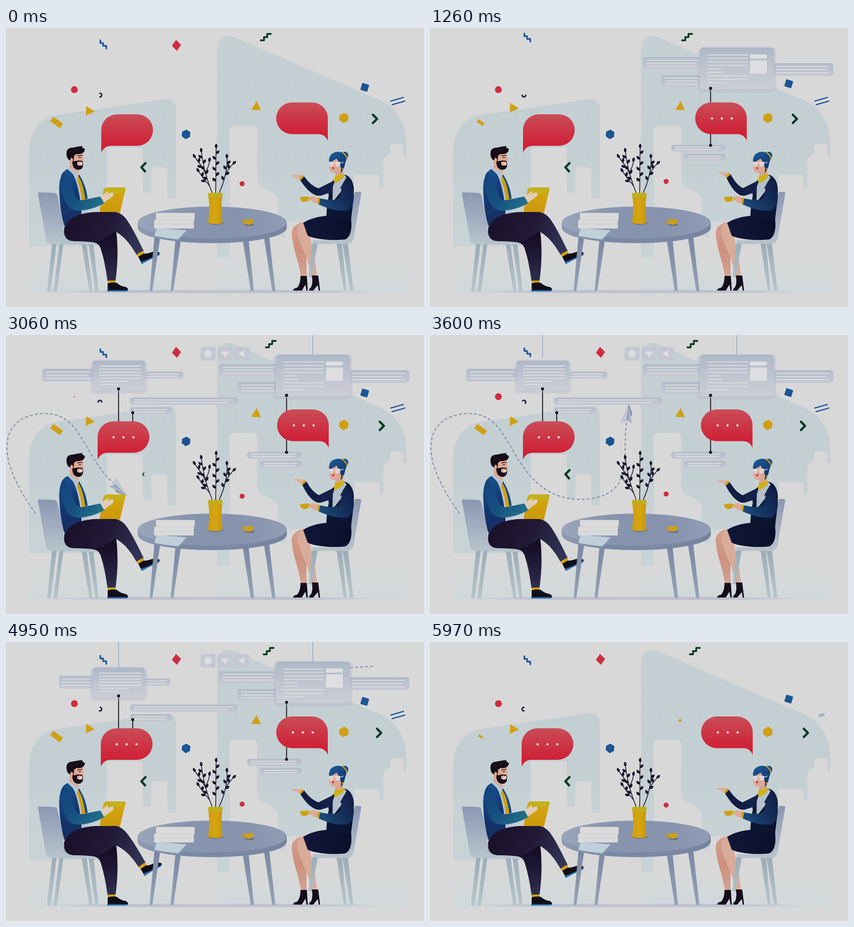
These frames come from a looping animation (917x611 px, 6000 ms). An HTML page:

```html
<!DOCTYPE html>
<html lang="en">
<head>
<meta charset="utf-8">
<title>Conversation at a round table</title>
<style>
  html, body { margin: 0; width: 100%; height: 100%; overflow: hidden; background: #d8d8d8; }
  svg { display: block; width: 100vw; height: 100vh; }
  .line { fill: none; stroke-linecap: round; stroke-linejoin: round; }
</style>
</head>
<body>
<svg id="stage" viewBox="0 0 917 611" xmlns="http://www.w3.org/2000/svg">
  <defs id="defs"></defs>

  <g id="backdrop">
    <path fill="url(#wall)" d="M51 478V270C51 228 73 197 108 191L348 156C364 154 373 164 373 178V374H362Q354 374 354 366V312Q354 305 347 305H326Q319 305 319 312V354Q319 361 312 361H307Q300 361 300 354V262H221V478Z"/>
    <path fill="url(#wall)" d="M463 506V44C463 20 482 12 503 21L820 158C857 174 878 210 878 250V281H872V261Q872 254 865 254H850Q843 254 843 261V276Q834 277 834 282Q828 282 828 289V342Q828 349 823 349Q819 349 819 343V329Q819 322 812 322H764V425H613V458Q596 456 596 448V378C596 366 585 361 572 354C558 348 551 345 551 331V224Q551 214 541 214H501Q491 214 491 224V506Z"/>
    <path fill="url(#ground)" d="M51 500H373V581H51ZM463 505H878V581H463Z"/>
    <ellipse cx="453" cy="577" rx="365" ry="3.500" fill="url(#floor)"/>
  </g>

  <g id="flight">
    <mask id="trail" maskUnits="userSpaceOnUse" x="-10" y="0" width="930" height="611">
      <path id="trim" class="line" stroke="#fff" stroke-width="8" style="stroke-linecap:butt"/>
    </mask>
    <g mask="url(#trail)">
      <path id="route" class="line" style="stroke-linecap:butt" stroke="#7f8eaa" stroke-width="2.200" stroke-dasharray="6.500 4.500"
        d="M65 391C48 366 25 335 9 288C-9 230 5 175 85 172C150 172 163 228 200 282C230 328 270 360 330 360C400 358 428 330 428 260C428 185 432 112 497 92C570 62 680 61 758 56L806 53"/>
    </g>
    <g id="plane">
      <path fill="#bfc5d1" d="M44 0L-3 -13L2 0Z"/>
      <path fill="#8590a8" d="M44 0L2 0L19 11Z"/>
      <path fill="#a9b2c2" d="M44 0L-1 12L4 3Z"/>
    </g>
  </g>

  <g id="cards"></g>
  <g id="bubbles"></g>
  <g id="confetti"></g>

  <g id="manChair">
    <path fill="url(#seatLeg)" d="M101 473H111L98 577H90ZM117 473H126L112 577H104ZM166 473H177L190 577H183ZM181 473H192L203 577H196Z"/>
    <path fill="url(#chair)" d="M70 363Q69 360 73 360L104 361Q111 361 113 368L126 428C124 456 135 465 152 466L194 467Q204 468 203 475L101 473Q90 473 88 464Z"/>
  </g>

  <g id="man">
    <path fill="url(#backLeg)" d="M150 466C190 470 202 465 208 484C216 509 219 530 223 555H240C246 515 246 470 241 440L180 425Z"/>
    <path fill="#d0a012" d="M224 553H240V560H224Z"/>
    <path fill="#110d18" d="M223 559Q234 556 243 558Q250 565 262 567Q268 569 268 575H223Z"/>
    <path fill="#246bab" d="M222 574H268Q267 577 263 577H222Z"/>
    <path fill="url(#folder)" d="M219 349H257Q263 349 262 354L250 404Q249 410 243 410L205 404L214 354Z"/>
    <path fill="#c5b01c" d="M219 349H257Q263 349 262 354L260 362H213L215 353Z"/>
    <path fill="#b8c3cc" d="M138 308L160 320C172 340 180 375 181 411H163C165 380 158 345 146 320Z"/>
    <path fill="#d0a012" d="M153 321L160 320L164 329C170 344 174 360 175 375L166 378C165 358 160 343 156 332Z"/>
    <path fill="#174a80" d="M159 319C168 331 177 352 179 374L174 375C171 354 167 337 159 325Z"/>
    <path fill="url(#jacket)" d="M135 309C121 314 115 335 117 361C118 386 121 408 128 434C140 419 153 412 166 410C164 374 157 336 146 319Z"/>
    <path fill="url(#trousers)" d="M128 437C135 417 162 405 195 403H241C258 408 260 436 241 445L207 467H153C132 468 125 456 128 437Z"/>
    <g id="shin">
      <path fill="url(#trousers)" d="M233 403C249 402 259 411 267 423C282 446 292 468 302 488L287 498C273 473 259 455 235 443C215 432 215 405 233 403Z"/>
      <path fill="#d0a012" d="M286 496L300 488L304 493L290 501Z"/>
      <path fill="#110d18" d="M290 501L302 494Q310 495 319 491Q330 488 337 492L335 498L297 514Z"/>
      <path fill="#246bab" d="M295 512L307 508L334 496L337 493Q338 497 334 499L312 509L298 517Z"/>
    </g>
    <path fill="url(#sleeve)" d="M126 316C137 318 140 341 147 357C152 371 157 378 167 377L207 369L217 383C199 393 181 399 160 400C143 400 134 393 128 375C121 352 116 323 126 316Z"/>
    <path fill="#dfcdb8" d="M207 369C214 365 220 358 225 357L223 363L233 360Q237 360 235 363L236 366L234 369L222 377L215 383Z"/>
    <path fill="#dda995" d="M140 286L148 296L158 308L160 319L152 319L139 309Z"/>
    <path fill="#b8c3cc" d="M135 308L141 306L160 320L156 331L147 320Z"/>
    <path fill="#dda995" d="M146 275L168 271L171 291L167 295V304L148 302Z"/>
    <path fill="#170e1a" d="M133 279C131 267 137 262 146 262C154 261 161 258 168 259L167 262Q172 263 173 266C172 274 165 277 155 276Q148 278 149 286L147 294L140 290Q134 287 133 279Z"/>
    <path fill="#170e1a" d="M145 284L149 292Q157 289 167 291L169 295V302C168 309 160 313 153 309C146 306 145 297 145 284Z"/>
    <path fill="#dda995" d="M156 294Q161 291 168 294V300Q160 304 156 299Z"/>
    <ellipse cx="144" cy="289" rx="3" ry="4.500" fill="#dda995"/>
    <path fill="#dfd0cb" d="M160 296Q164 294 167 296L166 300Q161 301 160 296Z"/>
    <path class="line" stroke="#170e1a" stroke-width="1.400" d="M157 280L167 279M160 284H164"/>
  </g>

  <g id="table">
    <path fill="url(#tableLeg)" d="M326 453H339L321 576H315ZM372 462H384L367 576H361ZM519 462H532L544 576H537ZM565 453H577L591 576H584Z"/>
    <path fill="url(#rim)" d="M289 427V438C292 458 365 471 452 471S613 458 616 438V427Z"/>
    <ellipse cx="452.500" cy="426" rx="163.500" ry="35" fill="url(#tableTop)"/>
    <path fill="#bfd0d8" d="M331 438L396 443L378 463Q350 460 325 455Z"/>
    <path fill="#dadada" d="M329 405H414V420H412V439H325V420H329Z"/>
    <path class="line" stroke="#c6c9cf" stroke-width="1" d="M329 419.500H414M325 429.500H411"/>
    <g id="plant"></g>
    <ellipse cx="460" cy="427" rx="18" ry="4" fill="#707b97"/>
    <path fill="url(#vase)" d="M443 365Q443 361 448 361H471Q476 361 475 366C472 386 472 406 475 425Q475 429 459 429T443 425C447 406 447 386 443 365Z"/>
    <path fill="#c0ae1c" d="M443 365Q443 361 448 361H471Q476 361 475 366L474 371H444Z"/>
    <ellipse cx="534" cy="431" rx="11" ry="2.500" fill="#626d89"/>
    <path class="line" stroke="#c9980f" stroke-width="2" d="M523 421Q518 421 519 425Q520 429 526 428"/>
    <path fill="#cfa013" d="M523 419H543C543 427 539 431 533 431S523 427 523 419Z"/>
  </g>

  <g id="womanChair">
    <path fill="url(#seatLeg)" d="M725 471H737L747 575H741ZM738 471H750L762 575H755Z"/>
  </g>
  <g id="woman">
    <path fill="url(#farLeg)" d="M655 425C637 427 626 437 627 452C629 484 643 512 647 546H659C660 514 656 486 668 458Z"/>
    <path fill="#d9ab9a" d="M655 425C644 428 637 438 640 452C646 480 667 513 671 546H682C680 513 674 484 666 455Z"/>
    <path fill="#130d1b" d="M646 543H660L662 575H659L657 562L649 575H630Q630 570 638 569Q646 562 646 543ZM671 542H685L689 575H686L684 563L674 575H665Q665 570 669 568Q674 559 671 542Z"/>
    <path fill="url(#seatLeg)" d="M672 471H684L670 546H664Z"/>
    <path fill="url(#chair)" d="M764 363Q765 359 769 359H776Q780 359 779 364L763 458Q760 473 746 473H688Q672 473 671 465H735Q755 460 757 425Z"/>
    <path fill="url(#skirt)" d="M704 411C685 413 664 418 652 427L662 455C682 464 720 466 744 463C758 457 759 435 757 418Z"/>
    <path fill="#d7a594" d="M723 311L737 307L741 324L722 331Z"/>
    <path fill="url(#suit)" d="M742 321C757 324 764 340 763 360C762 390 758 406 757 424L703 414C703 397 705 383 708 368L706 345L722 330Z"/>
    <path fill="#142149" d="M724 332L686 351C675 362 680 369 691 367L720 358Z"/>
    <g id="forearm">
      <path fill="#dfb09e" d="M652 322C643 322 638 321 630 322Q624 323 628 325L635 328Q641 331 647 332Z"/>
      <path fill="#cfa013" d="M650 322L655 326L648 335L643 331Z"/>
      <path fill="#101c42" d="M654 325L646 334C656 349 668 363 682 367C694 369 697 353 685 351C672 346 663 337 654 325Z"/>
    </g>
    <path fill="#b5c0c9" d="M741 320L747 327L733 351L739 353L716 382L717 348L722 333Z"/>
    <path fill="#d0b018" d="M722 323Q731 324 740 318L743 324L733 334L722 340L719 335Z"/>
    <path fill="url(#womanSleeve)" d="M745 333C758 332 764 351 763 373C761 398 751 401 736 400C718 399 700 393 685 386L688 373C704 376 720 379 731 373C737 361 734 340 745 333Z"/>
    <path fill="#cfa013" d="M684 371L689 373L687 386L682 384Z"/>
    <path fill="#dfa998" d="M684 372L674 368Q668 368 668 374L671 381Q677 384 683 383Z"/>
    <path class="line" stroke="#cfa013" stroke-width="2" d="M663 372Q669 371 668 375Q666 378 661 378"/>
    <path fill="#cfa013" d="M645 370L664 369C665 377 660 381 654 381S646 377 645 370Z"/>
    <path fill="#dca796" d="M711 286C708 295 708 309 713 315Q722 320 733 314L737 298L727 287Z"/>
    <circle cx="743" cy="279" r="8" fill="#174f87"/>
    <path fill="url(#hair)" d="M709 294C707 281 714 272 728 271C744 271 751 284 744 296Q742 311 734 318Q737 307 732 300Q729 290 725 286Q716 293 709 294Z"/>
    <path class="line" stroke="#cfa013" stroke-width="2.500" d="M738 272Q746 279 749 286"/>
    <path fill="#e0d4d3" d="M709 293H718Q720 302 714 304Q708 302 709 293ZM722 293H733Q735 303 728 304Q721 303 722 293Z"/>
    <path class="line" stroke="#ddd5d8" stroke-width="1.500" d="M716 295L724 296M733 296L740 294"/>
    <path fill="#c62132" d="M715 305L721 306L717 310Z"/>
    <circle cx="739" cy="309" r="2" fill="#d0a012"/>
  </g>
</svg>

<script>
const $ = id => document.getElementById(id);
const LOOP = 6000, STEP = 30;
const POSES = [0, 1260, 2070, 3060, 4170, 4950, 5970];
const WHITE = '#dedee0';

function add(parent, tag, attrs) {
  const el = document.createElementNS('http://www.w3.org/2000/svg', tag);
  for (const k in attrs) el.setAttribute(k, attrs[k]);
  return parent.appendChild(el);
}
const set = (el, value) => el.setAttribute('transform', value);
const clamp = v => Math.max(0, Math.min(1, v));
const ease = v => (1 - Math.cos(Math.PI * clamp(v))) / 2;
const span = (t, a, b) => ease((t - a) / (b - a));
const shown = (t, [a, b, c, d]) => span(t, a, b) * (1 - span(t, c, d));

function track(t, values, times = POSES, curve = ease) {
  let i = 0;
  while (i < times.length - 2 && t >= times[i + 1]) i++;
  const k = curve((t - times[i]) / (times[i + 1] - times[i]));
  return values[i] + (values[i + 1] - values[i]) * k;
}

// Gradients: id, direction in stage units, colours
function gradient(id, x1, y1, x2, y2, ...colours) {
  const g = add($('defs'), 'linearGradient', { id, x1, y1, x2, y2, gradientUnits: 'userSpaceOnUse' });
  colours.forEach((c, i) => add(g, 'stop', { offset: i / (colours.length - 1), 'stop-color': c }));
  return g;
}
gradient('wall', 0, 20, 0, 506, '#c5d0d4', '#c4cfd3', '#c9d4d7');
gradient('ground', 0, 500, 0, 581, '#d8d9d9', '#d5d9da', '#cfd8db');
gradient('floor', 90, 0, 818, 0, '#d0d4da', '#bcbfce', '#c2c4d2', '#bcbfce', '#d0d4da');
gradient('chair', 0, 360, 0, 474, '#8b98b2', '#a1adbf', '#b8c4cb');
gradient('seatLeg', 0, 473, 0, 577, '#9badb8', '#b6c4ca');
gradient('jacket', 117, 330, 160, 420, '#164d8b', '#14366f', '#172d62');
gradient('sleeve', 125, 320, 215, 385, '#14457f', '#17517f', '#23738c');
gradient('trousers', 130, 420, 300, 490, '#1a1129', '#211936', '#34375a');
gradient('backLeg', 0, 450, 0, 555, '#140c22', '#211a38', '#30304f');
gradient('farLeg', 0, 430, 0, 545, '#d5a08e', '#cd917e', '#d3a08f');
gradient('folder', 0, 349, 0, 410, '#d4a80f', '#cb960c');
gradient('tableTop', 289, 0, 616, 0, '#9aa6bb', '#8794ae', '#8793ad', '#909cb4');
gradient('rim', 289, 0, 616, 0, '#8d9ab2', '#7988a5', '#7b89a5', '#75839f');
gradient('tableLeg', 0, 460, 0, 576, '#7988a3', '#95a2b6');
gradient('vase', 443, 0, 476, 0, '#cf9d0e', '#d4a511', '#c99509');
gradient('suit', 704, 330, 762, 420, '#142248', '#0d1737', '#0a122d');
gradient('womanSleeve', 690, 385, 762, 340, '#1a4b78', '#15305c', '#111e44');
gradient('skirt', 660, 0, 757, 0, '#111638', '#0a1029');
gradient('hair', 710, 272, 740, 316, '#1b5e97', '#164480', '#15306a');
gradient('red', 0, 163, 0, 233, '#c94d57', '#d01f35');
gradient('redLow', 0, 189, 0, 259, '#c94d57', '#d01f35');
gradient('card', 0, 0, 0, 1, '#acb7c7', '#bfc5d0', '#cccdd6').setAttribute('gradientUnits', 'objectBoundingBox');
gradient('panel', 0, 0, 0, 1, '#b2bbc9', '#c6c9d4').setAttribute('gradientUnits', 'objectBoundingBox');

// Info cards
const cards = $('cards');
const reveals = [];

function group(times, origin, mode) {
  const g = add(cards, 'g', {});
  reveals.push({ g, times, origin, mode });
  return g;
}
function bars(g, x, y, widths, gap, weight = 2) {
  widths.forEach((w, i) =>
    add(g, 'rect', { x, y: y + i * gap - weight / 2, width: w, height: weight, rx: .9, fill: WHITE }));
}
function panel(x, y, w, h, anchor, times, rows) {
  const g = group(times, [anchor, y + h / 2], 'x');
  add(g, 'rect', { x, y, width: w, height: h, rx: 5, fill: 'url(#panel)' });
  bars(g, x + 8, y + h / (rows + 1), Array.from({ length: rows }, (_, i) => (w - 18) * (i % 2 ? .95 : 1)), h / (rows + 1));
}
function card(x, y, w, h, times) {
  const g = group(times, [x + w / 2, y + h / 2], 'xy');
  for (let i = 6; i > 0; i--)
    add(g, 'rect', { x: x - i, y: y - i + 3, width: w + 2 * i, height: h + 2 * i, rx: 7 + i, fill: '#a5a9c2', opacity: .07 });
  add(g, 'rect', { x, y, width: w, height: h, rx: 7, fill: 'url(#card)' });
  return g;
}
function cord(x, y1, y2, times, colour, dots = []) {
  const g = group(times, [x, y1], 'y');
  add(g, 'path', { d: `M${x} ${y1}V${y2}`, stroke: colour, 'stroke-width': 2 });
  dots.forEach(y => add(g, 'circle', { cx: x, cy: y, r: 3.3, fill: '#15121b' }));
}

const rightPanels = [750, 1230, 5100, 5400];
const leftPanels = [2600, 3000, 4760, 5240];
cord(673, 0, 44, [2600, 2980, 5080, 5350], '#a6b3c3');
cord(247, 0, 57, [3250, 3700, 5080, 5350], '#a6b3c3');

panel(467, 64, 133, 26, 592, rightPanels, 3);
panel(508, 103, 92, 26, 592, rightPanels, 3);
panel(750, 77, 135, 28, 755, rightPanels, 3);
panel(529, 256, 119, 15, 616, rightPanels, 2);
panel(557, 276, 92, 15, 616, rightPanels, 2);
cord(615.5, 132, 257, [350, 750, 5250, 5600], '#15121b', [132, 257]);
const big = card(592, 43, 163, 91, [500, 900, 5300, 5640]);
bars(big, 609, 59, [88, 88, 88, 88, 30, 33, 88, 88, 46], 7.6);
add(big, 'path', { fill: WHITE, d: 'M704 58H737Q739 58 739 60V65Q739 67 737 67H704Q702 67 702 65V60Q702 58 704 58ZM704 71H737Q739 71 739 73V98Q739 100 737 100H704Q702 100 702 98V73Q702 71 704 71Z' });
add(cards, 'circle', { id: 'pin', cx: 615.5, cy: 132, r: 3.3, fill: '#15121b' });

['M443 33a8 8 0 1 0 .1 0Z', 'M471 36H490L480.500 49Z', 'M509 41L523 33V49Z'].forEach((d, i) => {
  const x = 427 + 37 * i, at = 1450 + 130 * i;
  const g = group([at, at + 250, 5150, 5450], [x + 16.5, 41], 'xy');
  add(g, 'rect', { x, y: 26, width: 33, height: 30, rx: 5, fill: '#c5c8d3' });
  add(g, 'path', { d, fill: WHITE });
});

panel(79, 74, 117, 28, 190, leftPanels, 3);
panel(300, 80, 89, 16, 303, leftPanels, 2);
panel(272, 137, 237, 16, 278, [2550, 2980, 5050, 5400], 2);
panel(272, 158, 92, 16, 278, [2500, 2850, 5050, 5400], 2);
cord(247, 118, 195, [2250, 2550, 5200, 5500], '#15121b');
cord(278, 170, 195, [2300, 2550, 5200, 5500], '#15121b', [170]);
const small = card(190, 56, 115, 65, [2350, 2750, 5200, 5550]);
bars(small, 204, 68, [93, 93, 93, 93, 93, 65, 42], 6.7);
add(cards, 'circle', { id: 'pinLeft', cx: 247, cy: 118, r: 3.3, fill: '#15121b' });

// Speech bubbles, drawn from a left edge of zero
function bubble(y, fill, d, dotX) {
  const g = add($('bubbles'), 'g', {});
  add(g, 'path', { d, fill: `url(#${fill})` });
  const dots = [0, 1, 2].map(i => add(g, 'circle', { cx: dotX + 21.7 * i, cy: y, fill: WHITE }));
  return { g, dots };
}
const leftBubble = bubble(224, 'redLow', 'M34.500 189H79A34.500 34.500 0 0 1 79 258H20Q6 259 0 273V223.500A34.500 34.500 0 0 1 34.500 189Z', 35);
const rightBubble = bubble(198, 'red', 'M34.500 163H78.500A34.500 34.500 0 0 1 113 197.500V247Q107 233 93 232.500H34.500A34.500 34.500 0 0 1 34.500 163Z', 36.5);

// Confetti: shape around its own centre, place, optional tracks and shrink times
const RED = '#cf2c40', GOLD = '#d0a012', BLUE = '#1c5594', GREEN = '#0c3b25';
const hexagon = 'M-9 -6L1 -11L10 -5L9 6L-1 11L-10 4Z';
const confetti = [
  { d: 'M-7 -9V-3H-1V3H6V9', line: BLUE, w: 3.5, x: 214, y: [36, 21, 30, 40, 36, 39, 40] },
  { d: 'M-11 7H-4V0H3V-7H11', line: GREEN, w: 3.8, x: [570, 564, 572, 581, 570, 576, 581], y: 20 },
  { d: 'M-1 -12L10 -1L1 12L-10 1Z', fill: RED, x: 374, y: 38, dips: [1260, 4290] },
  { d: 'M-7.500 0a7.500 7.500 0 1 0 15 0a7.500 7.500 0 1 0 -15 0Z', fill: RED, x: 150, y: 135, dips: [3010] },
  { d: 'M0 -4A4 4 0 1 1 0 4', line: '#191832', w: 3, x: 206, y: 147, turn: [0, 90, 180, 270, 360, 375, 540] },
  { d: 'M-8 -10L11 2L-9 11Z', fill: GOLD, x: 184, y: [181, 174, 189, 188, 188, 189, 190] },
  { d: 'M-13 -6H13V6H-13Z', fill: GOLD, x: 111, y: 207, angle: 36, dips: [1080, 6090] },
  { d: 'M5 -9L-4 0L4 9', line: GREEN, w: 5, x: 301, y: 305, dips: [2940] },
  { d: hexagon, fill: BLUE, x: 395, y: 233, scale: .95, dips: [2010] },
  { d: 'M2 -11L11 9L-10 8Z', fill: GOLD, x: 548, y: 171, dips: [2030, 6090] },
  { d: 'M-6 -8H6Q8 -8 8 -6V6Q8 8 6 8H-6Q-8 8 -8 6V-6Q-8 -8 -6 -8Z', fill: BLUE, x: 787, y: [130, 122, 128, 127, 125, 130, 125], angle: 17 },
  { d: 'M-15 0L13 -8M-12 8L16 0', line: BLUE, w: 2.4, x: 859, y: 160, dips: [2070, 6090] },
  { d: hexagon, fill: GOLD, x: 741, y: 197, scale: 1.05 },
  { d: 'M-4 -9L5 0L-4 9', line: GREEN, w: 5, x: [809, 800, 816, 824, 811, 818, 824], y: 199 },
  { d: 'M-5.500 0a5.500 5.500 0 1 0 11 0a5.500 5.500 0 1 0 -11 0Z', fill: RED, x: 518, y: [341, 336, 357, 353, 343, 355, 357] }
];
confetti.forEach(c => {
  c.el = add($('confetti'), 'path', c.line
    ? { d: c.d, class: 'line', stroke: c.line, 'stroke-width': c.w }
    : { d: c.d, fill: c.fill });
});
const at = (v, t) => Array.isArray(v) ? track(t, v) : v;

// Twigs with alternating leaves
[
  'M460 362C461 330 460 290 461 264', 'M452 360C440 330 432 300 429 273',
  'M438 320C431 302 420 292 416 285', 'M446 345C437 334 430 326 424 316',
  'M468 360C480 335 486 305 485 286', 'M481 322C487 310 492 304 497 299', 'M438 316C442 308 445 302 446 294'
].forEach(d => {
  const p = add($('plant'), 'path', { d, class: 'line', stroke: '#17152a', 'stroke-width': 1.7 });
  const len = p.getTotalLength();
  const gap = 12, from = len < 60 ? len % gap + gap : len % gap + 2 * gap;
  for (let s = from, i = 0; s <= len + .01; s += gap, i++) {
    const a = p.getPointAtLength(s), b = p.getPointAtLength(s - 1);
    const dir = Math.atan2(a.y - b.y, a.x - b.x) * 180 / Math.PI;
    const last = s + gap > len + .01;
    (last ? [0] : i % 2 ? [44] : [-44]).forEach(turn =>
      add($('plant'), 'path', { d: 'M0 0Q5 -6.500 11 0Q5 5.500 0 0Z', fill: '#17152a', transform: `translate(${a.x} ${a.y}) rotate(${dir + turn})` }));
  }
});

// Paper plane
const route = $('route'), total = route.getTotalLength();
$('trim').setAttribute('d', route.getAttribute('d'));
function nearest(x, y) {
  let best = 0, min = 1e9;
  for (let s = 0; s <= total; s += 2) {
    const p = route.getPointAtLength(s), d = Math.hypot(p.x - x, p.y - y);
    if (d < min) { min = d; best = s; }
  }
  return best;
}
const headTimes = [2070, 3060, 4170, 4550];
const headStops = [0, nearest(237, 320), nearest(720, 58), total];
const tailTimes = [4350, 4950, 5130];
const tailStops = [0, nearest(740, 57), total];

function drawPlane(t) {
  const head = track(t, headStops, headTimes, clamp);
  const tail = track(t, tailStops, tailTimes, clamp);
  const flying = t >= 1980 && t < 5130;
  $('flight').style.display = flying ? '' : 'none';
  $('trim').setAttribute('stroke-dasharray', `0 ${tail} ${Math.max(0, head - tail)} ${total * 2}`);
  const a = route.getPointAtLength(Math.max(0, head - 3));
  const b = route.getPointAtLength(Math.min(total, Math.max(6, head + 3)));
  const p = route.getPointAtLength(head);
  const dir = Math.atan2(b.y - a.y, b.x - a.x) * 180 / Math.PI;
  const size = span(t, 1960, 2050) * (1 - span(t, 4350, 4600));
  set($('plane'), `translate(${p.x} ${p.y}) rotate(${dir}) scale(${size})`);
}

function draw(t) {
  reveals.forEach(({ g, times, origin: [x, y], mode }) => {
    const k = shown(t, times);
    g.style.display = k < .005 ? 'none' : '';
    const sx = mode === 'y' ? 1 : k, sy = mode === 'x' ? 1 : k;
    set(g, `translate(${x} ${y}) scale(${sx} ${sy}) translate(${-x} ${-y})`);
  });
  $('pin').style.display = t > 350 && t < 5580 ? '' : 'none';
  $('pinLeft').style.display = t > 2250 && t < 5480 ? '' : 'none';

  set(leftBubble.g, `translate(${track(t, [209, 204, 206, 201, 207, 208, 201])} 0)`);
  set(rightBubble.g, `translate(${track(t, [593, 582, 592, 595, 594, 593, 595])} 0)`);
  [[leftBubble, 2150], [rightBubble, 200]].forEach(([b, from]) =>
    b.dots.forEach((dot, i) => dot.setAttribute('r', 2.5 * span(t, from + 100 * i, from + 200 + 100 * i))));

  confetti.forEach(c => {
    const gap = Math.min(...(c.dips || [1e6]).map(d => Math.abs(t - d)));
    const size = (c.scale || 1) * clamp(gap / 300);
    const turn = (c.turn ? track(t, c.turn) : 0) + (c.angle || 0);
    c.el.style.display = size < .01 ? 'none' : '';
    set(c.el, `translate(${at(c.x, t)} ${at(c.y, t)}) rotate(${turn}) scale(${size})`);
  });

  const kick = track(t, [0, 0, -13, 0, 0, -4, -10, 0, 0], [0, 1650, 2070, 2500, 4800, 4950, 5100, 5500, 6000]);
  set($('shin'), `rotate(${kick} 235 425)`);
  set($('forearm'), `rotate(${track(t, [0, 8.6, 0, 8, 3, 0, 3])} 685 362)`);
  drawPlane(t);
}

const start = performance.now();
function tick() {
  const t = (performance.now() - start) % LOOP;
  draw(Math.floor(t / STEP) * STEP);
  requestAnimationFrame(tick);
}
tick();
</script>
</body>
</html>
```
